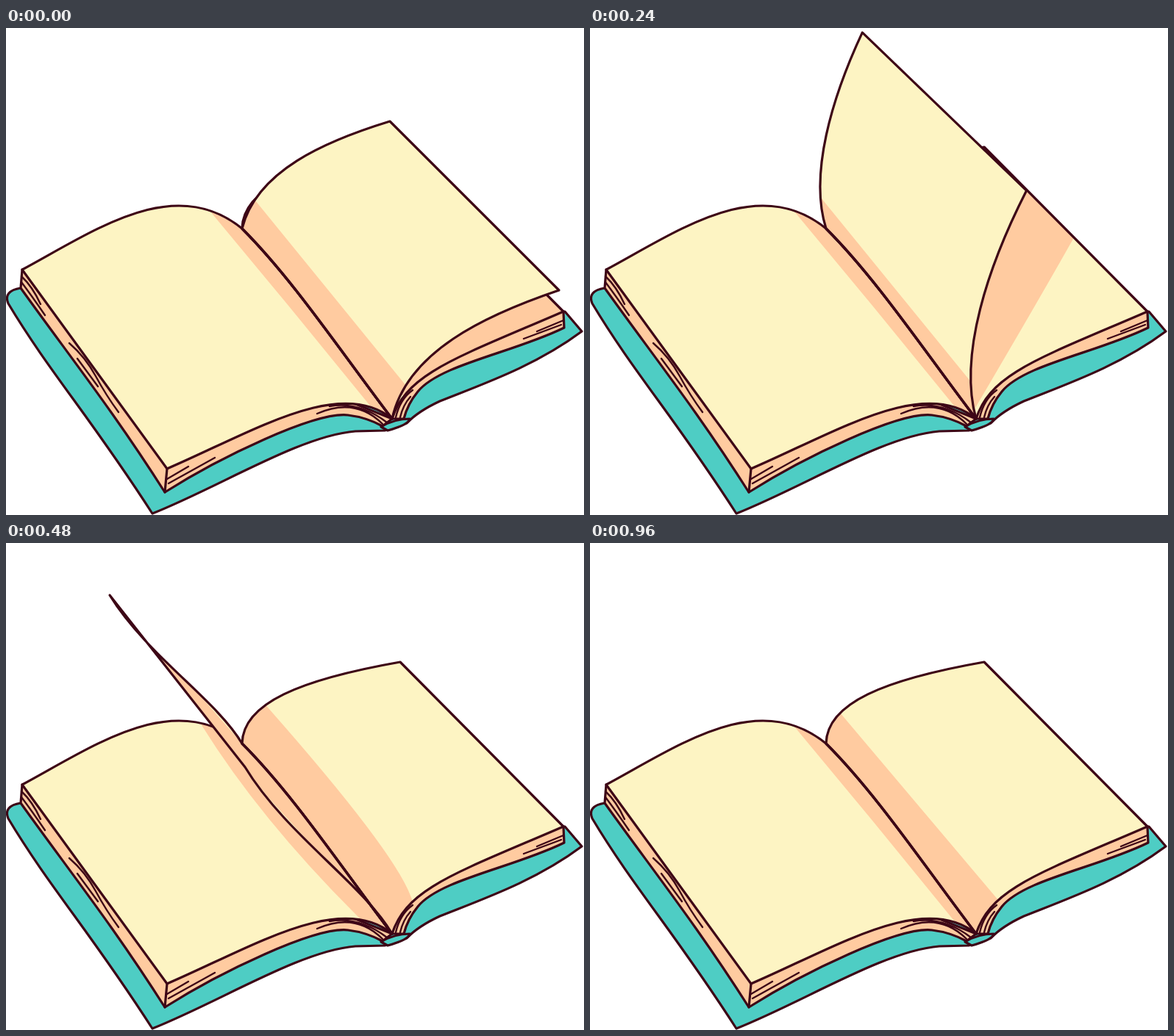
An HTML page with a canvas that plays this animation: 786 px wide and 663 px high, repeating every 1460 ms.

```html
<!DOCTYPE html>
<html lang="en">
<head>
<meta charset="utf-8">
<title>Turning page</title>
<style>
  html, body { margin: 0; width: 100%; height: 100%; overflow: hidden; background: #fff; }
  canvas { display: block; }
</style>
</head>
<body>
<canvas id="stage" width="786" height="663"></canvas>
<script>
const ctx = document.getElementById('stage').getContext('2d');
const LOOP = 1460, STEP = 80, LAST = 12;
const INK = '#3d0616', TEAL = '#4ecdc4', CREAM = '#fdf4c3', PEACH = '#ffcba0';

const pts = s => s.split(' ').map(p => p.split(',').map(Number));
const mix = (a, b, t) => a.map((v, i) => v + (b[i] - v) * t);

// Fixed parts
const spine = pts('321,273 390,342 455,440 525,532');
const [TOP, , , FOOT] = spine;
const left = { head: pts('321,273 229,198 122,275 22,329'), foot: pts('525,532 455,474 335,550 219,600') };
const right = { head: pts('321,273 322,218 400,186 536,162'), foot: pts('525,532 545,470 610,450 758,386') };

const spineLine = new Path2D('M321 273C390 342 455 440 525 532');
const cover = new Path2D('M20 354Q-4 358 3 375C60 470 115 530 199 661C290 625 400 555 475 549' +
  'L515 548 545 538Q560 522 590 508C650 484 720 460 783 413L760 386Z');
const leftBlock = new Path2D('M22 329L20 354C85 445 145 520 216 632C290 585 420 522 465 527' +
  'Q490 530 512 542L525 532Z');
const rightBlock = new Path2D('M758 386L759 408C690 442 590 458 560 495Q546 512 541 532L525 532 540 440');
const binding = new Path2D('M510 543Q528 532 549 532Q548 540 519 548Z');
const corner = new Path2D('M219 600L216 632');
const marks = new Path2D('M21 338Q36 352 47 376M21 346Q36 366 53 391' +
  'M86 429Q108 448 122 474T153 523M97 450L125 488M219 614L248 597M221 620L284 585' +
  'M423 525Q475 502 512 539M440 515Q480 508 518 537' +
  'M758 398L722 413M755 404L704 423M530 530Q536 505 553 493M536 530Q540 513 550 502');

// Key places of the turning page's two free corners
const corners = [
  '522,127 752,357', '438,30 667,259', '294,3 508,208', '141,71 325,305',
  '62,175 225,395', '30,276 225,546', '22,329 219,600'
].map(pts);

// Shadow edges on the still pages: start, control, end
const rightShade = [
  '800,200 900,500 600,500', '860,250 677,348 545,482', '512,167 681,216 553,480',
  '357,225 526,417 550,480', '345,237 447,358 550,480'
].map(pts);
const leftShade = [
  '278,250 385,378 490,508', '266,248 345,375 475,505',
  '273,432 290,475 415,514', '225,545 238,565 268,571'
].map(pts);

// Smooth motion through the key poses
function pose(keys, u) {
  const key = i => keys[Math.max(0, Math.min(keys.length - 1, i))];
  const i = Math.floor(u), f = u - i;
  return key(i).map((b, n) => b.map((q, d) => {
    const p = key(i - 1)[n][d], r = key(i + 1)[n][d], s = key(i + 2)[n][d];
    return q + f / 2 * (r - p + f * (2 * p - 5 * q + 4 * r - s + f * (3 * (q - r) + s - p)));
  }));
}

// Point at t on a Bezier curve
function at(curve, t) {
  while (curve.length > 1) curve = curve.slice(1).map((b, i) => mix(curve[i], b, t));
  return curve[0];
}

// Curve from a to b, bent sideways by two amounts relative to its length
function bent(a, b, b1, b2) {
  const dx = b[0] - a[0], dy = b[1] - a[1];
  const ctrl = (t, k) => [a[0] + dx * t + dy * k, a[1] + dy * t - dx * k];
  return [a, ctrl(.25, b1), ctrl(.65, b2), b];
}

function turning(u) {
  const p = u / 6, c = Math.cos(Math.PI * p);
  const bend = [.26 * c - .05, .12 * c + 2 * p ** 4 * (1 - p)];
  const [tip, low] = pose(corners, u);
  return { head: bent(TOP, tip, ...bend), foot: bent(FOOT, low, ...bend) };
}

// The shaded strip widens while the page is seen edge-on
function ownShade({ head, foot }, u) {
  const t = .18 + .8 * Math.exp(-(((u - 3) / .6) ** 2));
  const a = at(head, t), b = at(foot, t);
  return [a, mix(a, b, .5), b];
}

const curveTo = (p, c) => p.bezierCurveTo(...c.slice(1).flat());

function line(p, width = 3.2) {
  ctx.lineWidth = width;
  ctx.stroke(p);
}

function solid(p, color) {
  ctx.fillStyle = color;
  ctx.fill(p);
  line(p);
}

function sheet({ head, foot }, [a, q, b]) {
  const page = new Path2D(), shade = new Path2D(), back = [...spine].reverse();
  page.moveTo(...TOP);
  curveTo(page, head);
  page.lineTo(...foot[3]);
  curveTo(page, [...foot].reverse());
  curveTo(page, back);

  // Both ends run past the page edge and are clipped
  shade.moveTo(...TOP);
  shade.lineTo(...mix(q, a, 1.4));
  shade.lineTo(...a);
  shade.quadraticCurveTo(...q, ...b);
  shade.lineTo(...mix(q, b, 1.3));
  shade.lineTo(...FOOT);
  curveTo(shade, back);

  ctx.fillStyle = CREAM;
  ctx.fill(page);
  ctx.save();
  ctx.clip(page);
  ctx.fillStyle = PEACH;
  ctx.fill(shade);
  ctx.restore();
  line(page);
}

function draw(step) {
  const u = step / 2, done = step === LAST;
  ctx.clearRect(0, 0, 786, 663);
  ctx.strokeStyle = INK;
  ctx.lineCap = ctx.lineJoin = 'round';

  solid(cover, TEAL);
  solid(leftBlock, PEACH);
  solid(rightBlock, PEACH);
  sheet(left, pose(leftShade, done ? 0 : Math.max(0, u - 2)));
  sheet(right, pose(rightShade, u));
  line(corner);
  line(marks, 2.4);
  solid(binding, TEAL);

  if (!done) {
    const page = turning(u);
    sheet(page, ownShade(page, u));
  }
  line(spineLine, 3.6);
}

const start = performance.now();
function tick() {
  const t = (performance.now() - start) % LOOP;
  draw(Math.min(LAST, Math.floor(t / STEP)));
  requestAnimationFrame(tick);
}
tick();
</script>
</body>
</html>
```
